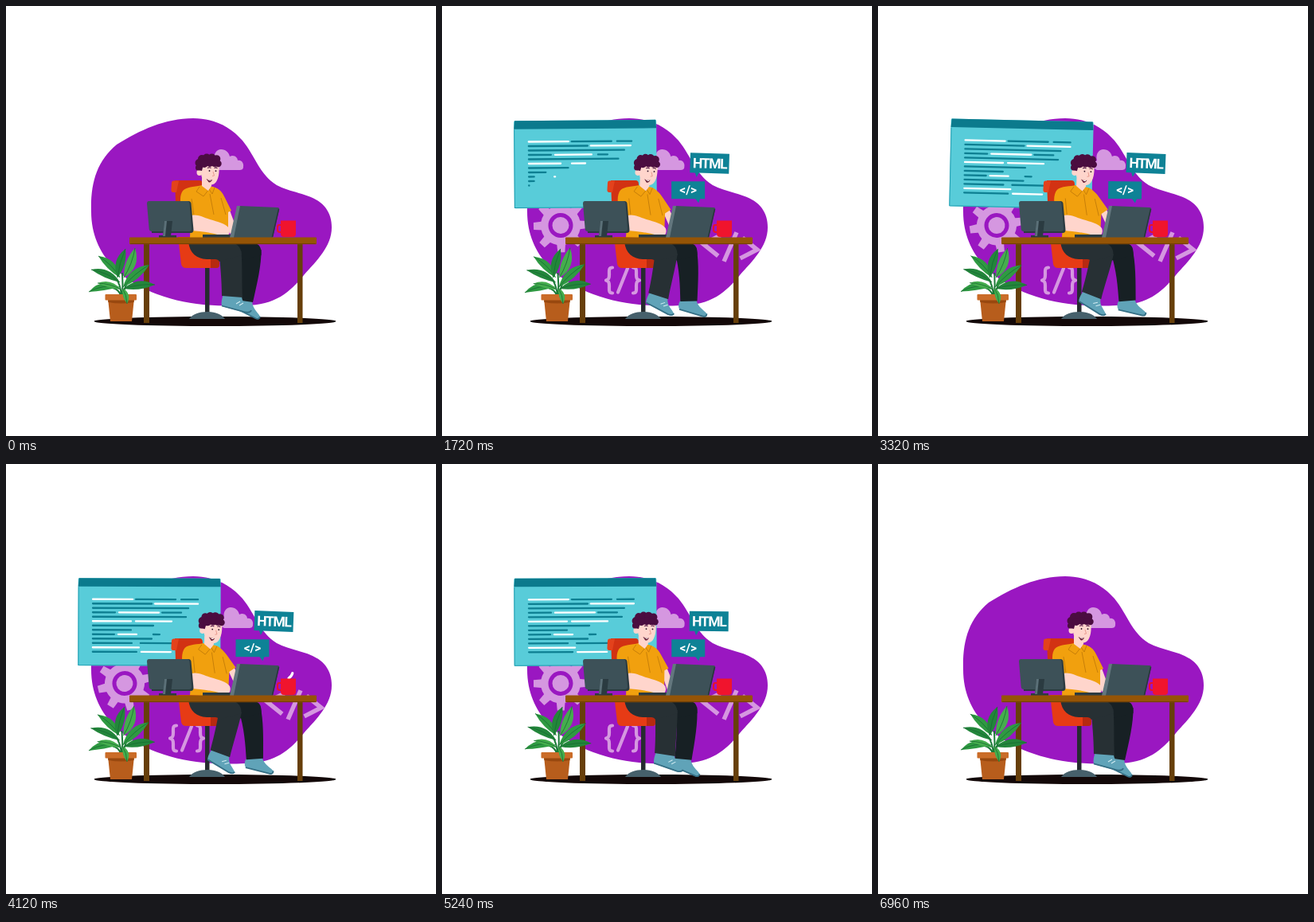
These frames come from a looping animation (540x540 px, 7000 ms). An HTML page:

```html
<!DOCTYPE html>
<html lang="en">
<head>
<meta charset="utf-8">
<title>Developer at a desk</title>
<style>
html, body { margin: 0; width: 100%; height: 100%; overflow: hidden; background: #fff; }
svg { display: block; width: 100vw; height: 100vh; }
text { font-family: Roboto, Inter, sans-serif; font-weight: 700; fill: #fff; text-anchor: middle; }
.pale { fill: #d597e0; }
.stroke { fill: none; stroke: #d597e0; }
.skin { fill: #ffd5cc; }
.hair { fill: #4b0d40; }
.shirt { fill: #f1a00e; }
.seam { fill: none; stroke: #bd7708; stroke-width: .8; }
.teal { fill: #0e8296; }
.steel { fill: #3d5158; }
.dark { fill: #2b3b41; }
.shoe { fill: #60a3b8; }
.sole { fill: none; stroke: #356f85; stroke-width: 1.8; }
</style>
</head>
<body>
<svg viewBox="0 0 540 540" xmlns="http://www.w3.org/2000/svg">
  <path fill="#9a17c1" d="M235 141C262 141 282 152 297 169C314 190 318 211 340 225C356 234 380 235 395 247C405 255 409 266 409 278C409 302 390 320 374 338C357 359 338 376 300 376C262 378 225 375 190 362C150 347 107 316 107 258C106 222 114 195 139 174C168 156 200 141 235 141Z"/>
  <ellipse cx="262.500" cy="396" rx="152" ry="6" fill="#130808"/>

  <g id="cloud" class="pale">
    <path d="M262 206C256 204 257 196 262 194C260 185 265 180 270 180C276 180 280 184 281 189C286 186 291 190 291 194C296 193 299 198 298 202C298 205 296 206 293 206Z"/>
  </g>
  <g id="gear"></g>
  <g id="braces" class="stroke" stroke-width="4.200" stroke-linecap="round" stroke-linejoin="round">
    <path d="M-13 -16C-18 -16 -17 -12 -17 -7C-17 -2 -18 -1 -21 0C-18 1 -17 2 -17 7C-17 12 -18 16 -13 16M13 -16C18 -16 17 -12 17 -7C17 -2 18 -1 21 0C18 1 17 2 17 7C17 12 18 16 13 16M6 -15L-6 15"/>
  </g>
  <g id="angle" class="stroke" stroke-width="5.500">
    <path d="M-14 -13L-34 0L-14 13M14 -13L34 0L14 13M6 -19L-6 19"/>
  </g>

  <g id="panel">
    <rect x="-89.500" y="-55" width="179" height="110" rx="1.500" fill="#58ccd9"/>
    <path d="M-88.500 -55H88.500L89.500 -44.500H-89.500Z" fill="#0b7a8d"/>
    <path d="M-89 -44V54.300H89" fill="none" stroke="#219db0" stroke-width="1"/>
    <g id="lines" stroke-width="2.300" stroke-linecap="round"></g>
  </g>
  <g id="htmlTag">
    <path class="teal" d="M-24.500 -12.500H24.500V12.500H-13L-16 18L-18 12.500H-24.500Z"/>
    <text y="6.300" font-size="17.500" letter-spacing="-1.400">HTML</text>
  </g>
  <g id="codeTag">
    <path class="teal" d="M-21 -11H21V11H15L13 16L9 11H-21Z"/>
    <text y="5" font-size="15.500">&lt;/&gt;</text>
  </g>

  <!-- chair -->
  <path fill="#d23213" d="M212 219H243Q247 219 247 224V246H213Z"/>
  <path fill="#e3421c" d="M210 219.500H217L214 234H210Q207 234 207.500 230L208 222Q208 219.500 210 219.500Z"/>
  <path fill="#262c2f" d="M250 326H255.500V387H250Z"/>
  <path fill="#46606b" d="M230 393C234 387 243 384 252.500 384C262 384 271 387 275 393Z"/>
  <path fill="#e63b15" d="M216 290H268V325Q268 329 264 329H226Q221 329 220 324Z"/>
  <path fill="#b72a10" d="M257 318H268V325Q268 329 264 329H257Z"/>

  <!-- far leg -->
  <g id="farLeg">
    <path class="shoe" d="M289 368C286 371 285 375 286 378L314 393Q319 394 319 390C316 384 310 381 309 371Z"/>
    <path class="sole" d="M286 378.500L314 392.500Q318 394 319 390"/>
    <path fill="#172024" d="M293 306H320.500C321 325 315 350 310 372L289 369C292 350 295 330 293 306Z"/>
  </g>
  <path fill="#172024" d="M262 297H309C319 298 321 304 320.500 313L292 320Z"/>

  <!-- near leg -->
  <g id="nearLeg">
    <path class="shoe" d="M273 362C271 367 270 373 271 377L301 385Q307 386 308 382C303 376 297 374 296 365Z"/>
    <path class="sole" d="M271 376.500L301 384.500Q307 385.500 308 382"/>
    <path d="M289 374L294 371M293 376L298 373" stroke="#d3edf3" stroke-width="1"/>
    <path fill="#273034" d="M267.500 308H295.500C297 327 296 350 297 366L271 364C271 345 269 325 267.500 308Z"/>
  </g>
  <path fill="#273034" d="M229 296H281C291 298 296 304 295.500 313L268 321C266 317 262 318 252 318C239 317 231 311 229 296Z"/>

  <!-- upper body -->
  <g id="body">
    <g id="farArm">
      <path class="skin" d="M271 252L280 254L290 281L281 286Z"/>
      <path class="shirt" d="M260 228C269 229 272 235 275 241L283 257L272 262Z"/>
    </g>
    <path class="shirt" d="M222 232C227 227 238 227 246 225L260 227C268 229 272 235 275 244L279 257V291H231L232 266L220 252C218 243 219 236 222 232Z"/>
    <path class="seam" d="M256 236L261 262M233 242L236 263M243 227L239 233L248 239L255 230L259 236L262 228M270 241L276 262"/>
    <path class="skin" d="M246 216L258 220V226L254 232L246 226Z"/>
    <path class="skin" d="M245 196H267C268 205 268 213 265 219C262 226 254 226 249 221C245 217 244 207 245 196Z"/>
    <ellipse class="skin" cx="243" cy="209" rx="3.500" ry="4"/>
    <g id="curls" class="hair"><path d="M243 191H267V199H248L246 207L241 206Z"/></g>
    <path d="M253 203.500Q255.500 202 257.500 203.500M261.500 203.500Q263.500 202 265.500 204" fill="none" stroke="#4b0d40" stroke-width="1"/>
    <circle cx="255.500" cy="207" r=".9" fill="#2b1228"/>
    <circle cx="263.500" cy="207.200" r=".9" fill="#2b1228"/>
    <path d="M260 208L261.500 213L259 213.500" fill="none" stroke="#e49588" stroke-width=".9"/>
    <path d="M251.500 217Q255 219 259 218Q257.500 222 254.500 221.300Z" fill="#651d33"/>
    <path d="M253 217.700Q255 218.800 258 218.200L257 219.500Q255 219.700 253 217.700Z" fill="#fff"/>
  </g>
  <path id="forearm" class="skin" d="M232 263C240 261 247 265 256 268C266 271 276 273 280 279Q282 284 279 288H269C257 284 242 283 233 282Z"/>

  <!-- desk equipment -->
  <path class="dark" d="M247 287H283V291H247Z"/>
  <path class="steel" d="M293 251L341 253Q344 253 343 256L335 291H283L291 253Z"/>
  <path fill="#63777e" d="M290 251H294L286 291H281Z"/>
  <path d="M342.500 255L334.500 290" stroke="#27363b" stroke-width="1.500"/>
  <path class="dark" d="M182 245H229Q232 245 232.500 248L235.500 281Q235.500 285 232 285H183Z"/>
  <path class="steel" d="M179.500 245H227.500Q230 245 230.500 248L233 280Q233 283 230 283H183Q180 283 179.700 280L177 248Q177 245 179.500 245Z"/>
  <path class="dark" d="M199 270H209L207 289H197ZM192 288H214V291H192Z"/>
  <path fill="#5b7078" d="M199 270H202L200 289H197Z"/>

  <!-- desk -->
  <path fill="#673f0a" d="M173 298H180V398H173ZM366 298H372.500V398H366Z"/>
  <rect x="155" y="290.500" width="235" height="8.700" rx="1" fill="#955406"/>
  <path d="M156 298.500H389" stroke="#744104" stroke-width="1.200"/>

  <path id="steam" d="M355 269C362 264 361 257 356 253C353 250 353 248 355 245" fill="none" stroke="#fff" stroke-width="3.200" stroke-linecap="round" pathLength="100"/>
  <path d="M347 275H343Q341 275 341 278V281Q341 284 344 284H347" fill="none" stroke="#e91228" stroke-width="2"/>
  <path fill="#f0142d" d="M345 269.500H364V286Q364 290 360 290H349Q345 290 345 286Z"/>

  <!-- plant -->
  <g id="plant"></g>
  <path fill="#b75d1c" d="M128 367H161L158 396H131Z"/>
  <path fill="#98480f" d="M128 369H161L160.500 372Q145 375 128.400 372Z"/>
  <rect x="124.500" y="362" width="39.500" height="7.500" rx="1" fill="#ca6c28"/>
  <g id="lowLeaf"></g>
</svg>
<script>
const LOOP = 7000;
const NS = 'http://www.w3.org/2000/svg';
const el = id => document.getElementById(id);

function add(parent, tag, attrs) {
  const node = document.createElementNS(NS, tag);
  for (const k in attrs) node.setAttribute(k, attrs[k]);
  parent.appendChild(node);
  return node;
}

function buildGear() {
  const gear = el('gear');
  for (let i = 0; i < 8; i++) {
    add(gear, 'path', { d: 'M-5.500 -22L-4.500 -34H4.500L5.500 -22Z', class: 'pale', transform: `rotate(${i * 45})` });
  }
  add(gear, 'circle', { r: 25, class: 'pale' });
  add(gear, 'circle', { r: 13, fill: '#d597e0', stroke: '#9a17c1', 'stroke-width': 5 });
}

function buildCurls() {
  const curls = [[242.5, 197, 5], [246, 192, 5], [252, 190.5, 5], [258.5, 190.5, 5], [264.5, 192, 4.8],
    [266.5, 198, 4.2], [241.5, 203, 3.6], [256, 197, 5], [249, 198, 5], [262, 198, 4]];
  curls.forEach(([cx, cy, r]) => add(el('curls'), 'circle', { cx, cy, r }));
}

// Each row: start, end, colour (w white, d dark)
const ROWS = [
  [[109, 159, 'w'], [163, 213, 'd'], [220, 241, 'd']],
  [[109, 183, 'd'], [187, 241, 'w']],
  [[109, 229, 'd']],
  [[109, 137, 'd'], [142, 192, 'w'], [196, 220, 'd']],
  [[109, 226, 'd']],
  [[109, 157, 'w'], [163, 208, 'w']],
  [[109, 185, 'd']],
  [[109, 157, 'd']],
  [[109, 136, 'd'], [141, 164, 'w'], [185, 193, 'd']],
  [[109, 183, 'd']],
  [[109, 158, 'd'], [169, 208, 'd']],
  [[109, 167, 'w']],
  [[109, 164, 'd'], [170, 207, 'w']]
];
const lines = [];

function buildLines() {
  ROWS.forEach((row, i) => row.forEach(([a, b, c]) => {
    const y = -28.5 + i * 5.5;
    const node = add(el('lines'), 'line', { x1: a - 180, y1: y, y2: y, stroke: c === 'w' ? '#fff' : '#0d7f92' });
    lines.push({ node, a: a - 180, b: b - 180, start: 1000 + i * 70 + (a - 109) * 3 });
  }));
}

function leaf(group, x0, y0, x1, y1, w, bend, fill) {
  const dx = x1 - x0, dy = y1 - y0, len = Math.hypot(dx, dy);
  const nx = -dy / len, ny = dx / len;
  const mid = k => `${x0 + dx * .5 + nx * k} ${y0 + dy * .5 + ny * k}`;
  add(el(group), 'path', { d: `M${x0} ${y0}Q${mid(bend + w)} ${x1} ${y1}Q${mid(bend - w)} ${x0} ${y0}Z`, fill });
  add(el(group), 'path', { d: `M${x0} ${y0}Q${mid(bend)} ${x1} ${y1}`, fill: 'none', stroke: '#176b32', 'stroke-width': .8 });
}

function buildPlant() {
  add(el('plant'), 'path', {
    d: 'M145 364Q144 350 138 342M146 364Q147 350 146 335M147 364Q149 350 156 344M144 364Q142 356 134 354',
    fill: 'none', stroke: '#1b7a37', 'stroke-width': 2
  });
  const mid = '#2f9a42', deep = '#23863b', lit = '#45ad4d';
  [[143, 341, 116, 314, 10, 5, mid], [143, 347, 107, 331, 9, 5, deep], [142, 353, 104, 359, 9, 7, mid],
   [144, 356, 115, 348, 7, 4, lit], [140, 341, 150, 305, 11, -3, deep], [148, 341, 162, 304, 12, 4, lit],
   [147, 353, 180, 325, 11, -4, mid], [148, 355, 187, 350, 10, -4, deep]
  ].forEach(v => leaf('plant', ...v));
  leaf('lowLeaf', 146, 354, 152, 374, 7, -3, lit);
}

const smooth = (t, a, b) => {
  const x = Math.min(1, Math.max(0, (t - a) / (b - a)));
  return x * x * (3 - 2 * x);
};
const wave = (t, n) => Math.sin(2 * Math.PI * n * t / LOOP);
const show = (t, inA, inB, outA, outB) => smooth(t, inA, inB) * (1 - smooth(t, outA, outB));

// Lean of the body and swing of the legs
const LEAN = [[0, 0], [960, .4], [2200, 1], [3600, 1], [4120, .95], [5240, .25], [6080, .06], [7000, 0]];
function lean(t) {
  let i = 1;
  while (t > LEAN[i][0]) i++;
  const [a, va] = LEAN[i - 1], [b, vb] = LEAN[i];
  return va + (vb - va) * (t - a) / (b - a);
}

const put = (id, x, y, turn, scale) =>
  el(id).setAttribute('transform', `translate(${x} ${y}) rotate(${turn}) scale(${scale})`);
const turn = (id, deg, x, y) => el(id).setAttribute('transform', `rotate(${deg} ${x} ${y})`);

function draw(t) {
  const u = lean(t), sway = wave(t, 6);
  const drift = 6.5 * (1 - Math.cos(2 * Math.PI * t / LOOP));
  put('cloud', drift, 0, 0, 1);

  const icon = show(t, 400, 1130, 5910, 6600);
  put('gear', 149, 275.5, t / LOOP * 360, show(t, 300, 900, 6100, 6700));
  put('braces', 227, 344.5, 0, icon);
  put('angle', 362, 302.5, 6, icon);

  put('panel', 180, 198.5, -.15 - 1.75 * sway, show(t, 250, 850, 6150, 6750));
  for (const l of lines) {
    const p = smooth(t, l.start, l.start + 500);
    l.node.setAttribute('x2', l.a + (l.b - l.a) * p);
    l.node.setAttribute('visibility', p > 0 ? 'visible' : 'hidden');
  }
  const tag = show(t, 350, 900, 6150, 6700);
  put('htmlTag', 334.8 + 1.7 * u, 197.5, 2.2 * u, tag);
  put('codeTag', 309.3 - sway, 231.2, -sway, tag);

  turn('body', 2.7 * u, 245, 290);
  turn('farArm', -12 * u, 268, 236);
  put('forearm', u, 0, 0, 1);
  turn('nearLeg', 17 * u, 281, 311);
  turn('farLeg', -13 * u, 306, 311);
  turn('plant', 1.2 * wave(t, 3), 146, 362);

  const s = t % 1750 / 1750;
  const head = 100 * smooth(s, .22, .6), tail = 100 * smooth(s, .52, .9);
  const steam = el('steam');
  steam.setAttribute('stroke-dasharray', `${Math.max(0, head - tail)} 300`);
  steam.setAttribute('stroke-dashoffset', -tail);
  steam.setAttribute('visibility', head - tail > 1 ? 'visible' : 'hidden');
}

buildGear();
buildCurls();
buildLines();
buildPlant();

const begin = performance.now();
function frame() {
  draw((performance.now() - begin) % LOOP);
  requestAnimationFrame(frame);
}
frame();
</script>
</body>
</html>
```
